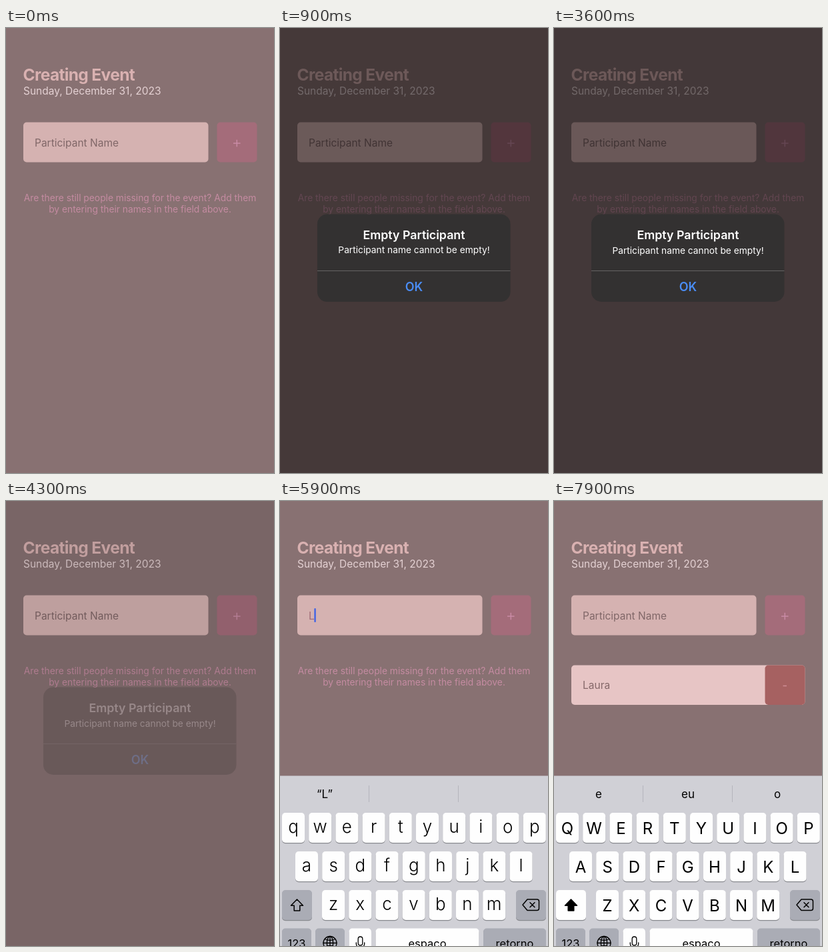
Write an HTML page that moves like this. It is 402 by 668 pixels and loops after 8 s.

```html
<!DOCTYPE html>
<html lang="en">
<head>
<meta charset="utf-8">
<title>Creating Event</title>
<style>
html, body { margin: 0; width: 100%; height: 100%; overflow: hidden; background: #887172; }
svg { display: block; width: 100vw; height: 100vh; font-family: Inter, "Open Sans", sans-serif; }
.mid { text-anchor: middle; }
.line { fill: none; stroke: #000; stroke-width: 1.5; stroke-linecap: round; stroke-linejoin: round; }
</style>
</head>
<body>
<svg id="stage" viewBox="0 0 402 668">
  <rect width="402" height="668" fill="#887172"/>
  <text x="25.5" y="78.5" font-size="24.5" font-weight="700" letter-spacing="-.65" fill="#d9b1b1">Creating Event</text>
  <text x="26" y="99.5" font-size="15.5" fill="#e4d1d3">Sunday, December 31, 2023</text>
  <rect x="26" y="141.5" width="277.5" height="60" rx="5" fill="#d5b2b1"/>
  <text id="field" x="43" y="177.7" font-size="15.5"></text>
  <rect id="caret" y="161" width="2.4" height="21" rx="1" fill="#3f63e6"/>
  <g id="add">
    <rect x="316.5" y="141.5" width="60" height="60" rx="5" fill="#a46c7a"/>
    <path d="M341 173h10.6M346.3 167.7v10.6" stroke="#c98ba5" stroke-width="1.5"/>
  </g>
  <g id="hint" class="mid" font-size="13.8" fill="#c48ba1">
    <text x="201" y="260">Are there still people missing for the event? Add them</text>
    <text x="201" y="276.5">by entering their names in the field above.</text>
  </g>
  <g id="item">
    <rect x="26" y="246.5" width="350.5" height="59.5" rx="5" fill="#e7c5c5"/>
    <rect x="316.5" y="246.5" width="60" height="59.5" rx="5" fill="#a66161"/>
    <text id="person" x="43" y="281.5" font-size="15.5" fill="#856869"></text>
    <path d="M343.5 277.5h5.5" stroke="#cf8d94" stroke-width="1.5"/>
  </g>
  <rect id="dim" width="402" height="668"/>
  <g id="alert" class="mid">
    <rect x="56" y="279.5" width="289.5" height="131.5" rx="15" fill="#333131"/>
    <path d="M56 364.5h289.5" stroke="#656363"/>
    <text x="201" y="317" font-size="17.8" font-weight="600" fill="#fff">Empty Participant</text>
    <text x="201" y="338.5" font-size="13.75" fill="#fff">Participant name cannot be empty!</text>
    <text x="201" y="394.5" font-size="18" font-weight="600" fill="#4a8df6">OK</text>
  </g>
  <g id="board">
    <rect y="412.5" width="402" height="360" fill="#d0d0d6"/>
    <path d="M133.5 427v25M267.5 427v25" stroke="#b6b6bd"/>
    <g id="words" class="mid" font-size="17"></g>
    <g id="keys" class="mid"></g>
    <path id="shift" d="M25.5 598L34.5 607.2H29.8V615H21.2V607.2H16.5Z" class="line"/>
    <path d="M371 598H385.5q3 0 3 3v10.5q0 3-3 3H371L364 606.3ZM375 602.8l7 7m0-7l-7 7" class="line"/>
    <g class="line" style="stroke-width:1.3">
      <circle cx="75" cy="663.5" r="10"/>
      <ellipse cx="75" cy="663.5" rx="4.6" ry="10"/>
      <path d="M75 653.5v20M65 663.5h20M67 657.5q8 4 16 0M67 669.5q8-4 16 0"/>
      <rect x="117.2" y="654" width="6.6" height="13" rx="3.3"/>
      <path d="M114.3 663v1.5a6.2 6.2 0 0 0 12.4 0v-1.5M120.5 671v3"/>
    </g>
    <g class="mid" font-size="16.5">
      <text x="25" y="669.5">123</text>
      <text x="221" y="669.5">espaço</text>
      <text x="352" y="669.5">retorno</text>
    </g>
    <g id="popup" class="mid">
      <path fill="#fdfdfe" stroke="#b9bac0" stroke-width=".8"/>
      <text font-size="37"></text>
    </g>
  </g>
</svg>
<script>
const LOOP = 8000, STEP = 100, NAME = "Laura";
const PITCH = 40.2, KEY_W = 34, KEY_H = 45;
const ROWS = [["qwertyuiop", 20, 468], ["asdfghjkl", 40, 526], ["zxcvbnm", 80, 584]];
const $ = id => document.getElementById(id);

function make(parent, tag, attrs) {
  const el = document.createElementNS("http://www.w3.org/2000/svg", tag);
  set(el, attrs);
  return parent.appendChild(el);
}
function set(el, attrs) {
  for (const name in attrs) el.setAttribute(name, attrs[name]);
}
function show(el, on) {
  el.style.display = on ? "" : "none";
}
function addKey(x, y, w, fill) {
  make($("keys"), "rect", { x, y: y + 1.2, width: w, height: KEY_H, rx: 5, fill: "#898a8f" });
  return make($("keys"), "rect", { x, y, width: w, height: KEY_H, rx: 5, fill });
}

const GREY = "#aaacb5", WHITE = "#fefefe";
const letters = {};
for (const [chars, start, y] of ROWS) {
  [...chars].forEach((char, i) => {
    const x = start + i * PITCH;
    addKey(x - KEY_W / 2, y, KEY_W, WHITE);
    letters[char] = { x, y, el: make($("keys"), "text", { x }) };
  });
}
const shiftKey = addKey(3, 584, 45, WHITE);
addKey(354, 584, 45, GREY);
addKey(3, 641.5, 44, GREY);
addKey(53, 641.5, 44, GREY);
addKey(103.5, 641.5, 33.5, WHITE);
addKey(143.5, 641.5, 155, WHITE);
addKey(305, 641.5, 94, GREY);
const words = [67, 201, 335].map(x => make($("words"), "text", { x, y: 445.5 }));
$("person").textContent = NAME;

// Critically damped spring from 0 to 1, time in ms
function spring(ms, rate) {
  const x = Math.max(0, ms) / 1000 * rate;
  return 1 - (1 + x) * Math.exp(-x);
}
// Linear interpolation through [time, value] points
function track(t, points) {
  if (t <= points[0][0]) return points[0][1];
  for (let i = 1; i < points.length; i++) {
    const [t0, a] = points[i - 1], [t1, b] = points[i];
    if (t <= t1) return a + (b - a) * (t - t0) / (t1 - t0);
  }
  return points[points.length - 1][1];
}
// Last value whose start time has passed
function latest(t, points) {
  return points.reduce((value, [start, v]) => t >= start ? v : value, points[0][1]);
}

const TYPED = [[0, 0], [5900, 1], [6100, 2], [6300, 3], [6400, 4], [6600, 5], [7000, 0]];
const PRESSED = [[0, -1], [5800, 0], [5900, -1], [6000, 1], [6100, -1], [6200, 2], [6300, 3], [6400, -1], [6500, 4], [6600, -1]];

function drawAlert(t) {
  const leaving = t >= 4200;
  const amount = t >= 4400 ? 0 : leaving ? 1 - spring(t - 4175, 22.8) : spring(t - 519, 22.8);
  const scale = leaving ? 1 : 1.185 - 0.185 * amount;
  set($("dim"), { opacity: amount * 0.5 });
  set($("alert"), { opacity: amount, transform: `translate(201 345) scale(${scale}) translate(-201 -345)` });
}

function drawField(t) {
  const count = latest(t, TYPED), field = $("field");
  field.textContent = count ? NAME.slice(0, count) : "Participant Name";
  set(field, { fill: count ? "#a06c78" : "#806768" });
  const end = count ? field.getComputedTextLength() : 0;
  set($("caret"), { x: 42.6 + end, opacity: t < 5100 ? 0 : track(t, [[7700, 1], [7900, 0]]) });
  return count;
}

function drawPopup(t, upper) {
  const index = latest(t, PRESSED);
  show($("popup"), index >= 0);
  if (index < 0) return;
  const char = NAME[index].toLowerCase(), { x, y } = letters[char];
  const [shape, label] = $("popup").children;
  set(shape, { d: `M${x - 17} ${y + 40}V${y + 6}C${x - 17} ${y - 4} ${x - 32} ${y - 4} ${x - 32} ${y - 15}` +
    `V${y - 49}q0-9 9-9H${x + 23}q9 0 9 9V${y - 15}C${x + 32} ${y - 4} ${x + 17} ${y - 4} ${x + 17} ${y + 6}` +
    `V${y + 40}q0 5-5 5H${x - 12}q-5 0-5-5Z` });
  set(label, { x, y: y - 17 });
  label.textContent = upper ? char.toUpperCase() : char;
}

function drawBoard(t, count) {
  show($("board"), t >= 5100);
  set($("board"), { transform: `translate(0 ${359 * (1 - spring(t - 5035, 18.26))})` });
  const upper = count === 0;
  for (const char in letters) {
    const { y, el } = letters[char];
    el.textContent = upper ? char.toUpperCase() : char;
    set(el, { y: y + (upper ? 31.5 : 30), "font-size": upper ? 24 : 26, "font-weight": upper ? 400 : 300 });
  }
  set(shiftKey, { fill: upper ? WHITE : GREY });
  set($("shift"), { style: upper ? "fill:#000" : "" });
  const guesses = t >= 7100 ? ["e", "eu", "o"] : count ? [`“${NAME.slice(0, count)}”`, "", ""] : ["", "", ""];
  words.forEach((el, i) => el.textContent = guesses[i]);
  drawPopup(t, upper);
}

function draw(now) {
  const t = Math.floor(now % LOOP / STEP) * STEP;
  const added = t >= 7000;
  show($("item"), added);
  show($("hint"), !added);
  set($("add"), { opacity: track(t, [[400, 1], [500, 0.35], [600, 0.3], [850, 1], [6700, 1], [6800, 0.5], [6900, 0.25], [7000, 0.3], [7300, 1]]) });
  drawAlert(t);
  drawBoard(t, drawField(t));
}

const origin = performance.now();
function tick() {
  draw(performance.now() - origin);
  requestAnimationFrame(tick);
}
tick();
</script>
</body>
</html>
```
